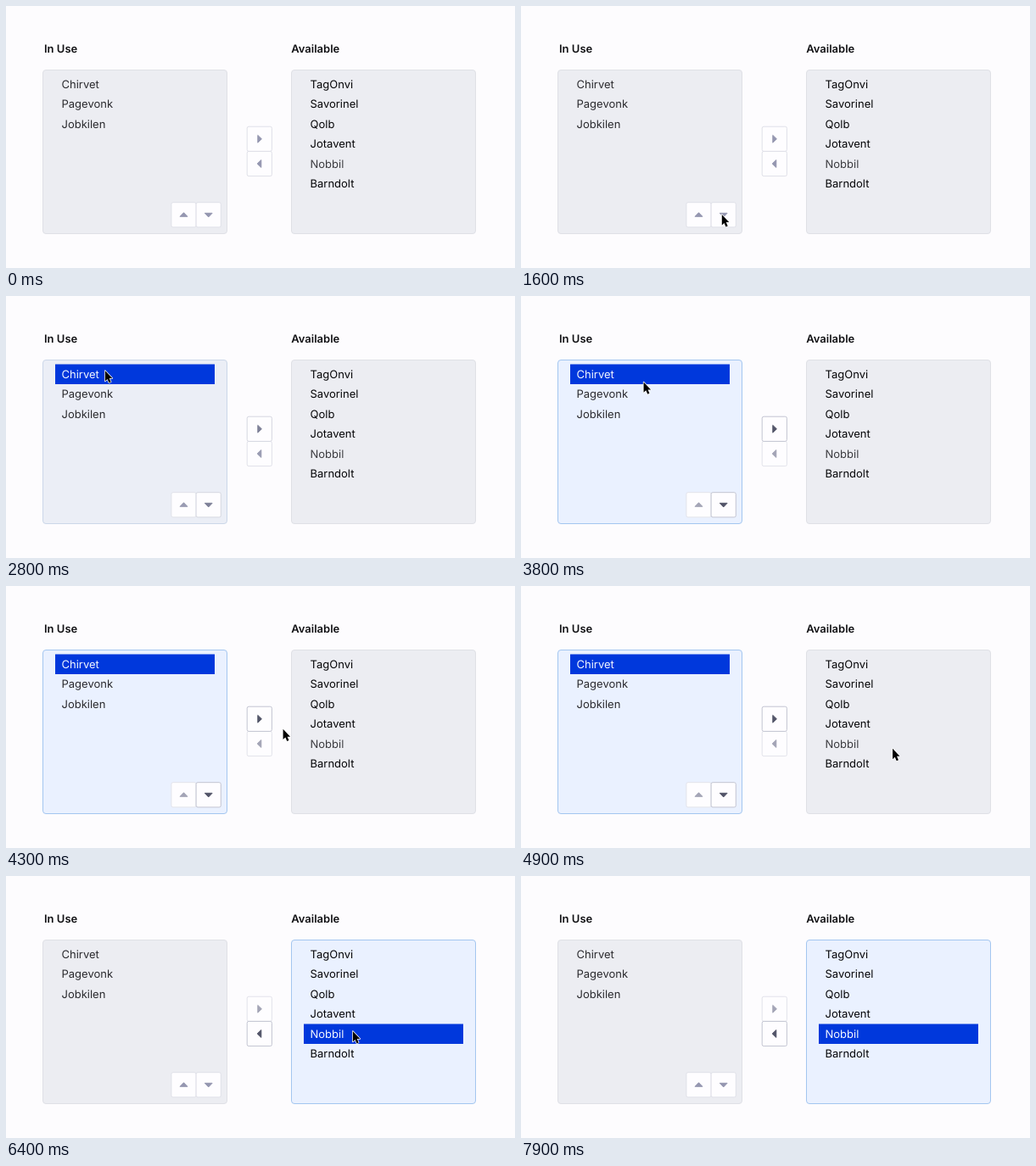
An HTML page for the animation above (9 s loop, 600 by 309 pixels).

```html
<!DOCTYPE html>
<html lang="en">
<head>
<meta charset="utf-8">
<title>List picker</title>
<style>
  html, body { margin: 0; width: 100%; height: 100%; overflow: hidden; background: #fdfcfe; }
  svg { display: block; width: 100%; height: 100%; }
  text { font: 400 13px Inter, sans-serif; text-rendering: geometricPrecision; }
  .title { font-weight: 600; fill: #111114; }
</style>
</head>
<body>
<svg id="stage" viewBox="0 0 600 309"></svg>
<script>
const LOOP = 9000, STEP = 100, FADE = 300;
const CLICKS = [2800, 6100];
const ROW = 23.5, CELL = 29.2;
const THEME = {
  panel: { idle: '#ecedf2', on: '#eaf1ff' },
  outline: { idle: '#dfe0e6', on: '#a3c6f0' },
  arrow: { idle: '#9496b0', on: '#525468', off: '#a3a4b6' },
  edge: { idle: '#dfe0e8', on: '#c2c4d1', off: '#e2e3ea' }
};
const stage = document.getElementById('stage');

function add(tag, attrs = {}, parent = stage) {
  const el = document.createElementNS('http://www.w3.org/2000/svg', tag);
  for (const key in attrs) el.setAttribute(key, attrs[key]);
  parent.append(el);
  return el;
}

function label(x, y, content, attrs) {
  const el = add('text', { x, y, ...attrs });
  el.textContent = content;
  return el;
}

const show = (el, visible) => el.setAttribute('visibility', visible ? 'visible' : 'hidden');

// Colour on the way from the previous phase's look to the current one.
function shade(colors, looks, { phase, amount }) {
  const from = colors[looks[Math.max(0, phase - 1)]], to = colors[looks[phase]];
  return `color-mix(in srgb, ${to} ${amount * 100}%, ${from})`;
}

function makeList(x, title, titleX, names, color, picked, looks) {
  label(titleX, 54.6, title, { class: 'title' });
  const panel = add('rect', { x: x + 0.5, y: 75.5, width: 217, height: 193, rx: 3.5 });
  const rowY = i => 80.5 + ROW * i;
  const bar = add('rect', { x: x + 15, y: rowY(picked), width: 188, height: ROW, fill: '#0038dc' });
  const rows = names.map((name, i) => label(x + 22.5, rowY(i) + 16.1, name, { fill: color(i) }));
  return state => {
    const selected = looks[state.phase] === 'on';
    panel.style.fill = shade(THEME.panel, looks, state);
    panel.style.stroke = shade(THEME.outline, looks, state);
    show(bar, selected);
    rows[picked].setAttribute('fill', selected ? '#f4f7ff' : color(picked));
  };
}

function makeButton(x, y, angle, looks) {
  const group = add('g');
  const box = add('rect', { x, y, width: CELL, height: CELL, rx: 2, fill: '#fefdff' }, group);
  const arrow = add('path', {
    d: 'M-2 -4.4L2.6 0L-2 4.4Z', 'stroke-width': 1, 'stroke-linejoin': 'round',
    transform: `translate(${x + CELL / 2} ${y + CELL / 2}) rotate(${angle})`
  }, group);
  return state => {
    arrow.style.fill = arrow.style.stroke = shade(THEME.arrow, looks, state);
    box.style.stroke = shade(THEME.edge, looks, state);
    if (looks[state.phase] === 'on') stage.insertBefore(group, cursor);
  };
}

const parts = [
  makeList(43, 'In Use', 45, ['Chirvet', 'Pagevonk', 'Jobkilen'],
    () => '#2a2a2e', 0, ['idle', 'on', 'idle']),
  makeList(336, 'Available', 336.2,
    ['TagOnvi', 'Savorinel', 'Qolb', 'Jotavent', 'Nobbil', 'Barndolt'],
    i => i === 4 ? '#3c3c40' : '#060608', 4, ['idle', 'idle', 'on']),
  makeButton(284.2, 142.2, 0, ['idle', 'on', 'off']),
  makeButton(284.2, 142.2 + CELL, 180, ['idle', 'off', 'on']),
  makeButton(194.9, 231.7, -90, ['idle', 'off', 'idle']),
  makeButton(194.9 + CELL, 231.7, 90, ['idle', 'on', 'idle'])
];

const cursor = add('g');
add('path', {
  d: 'M.8 1V13.4L3.5 10.9L5.5 15.4L7.7 14.4L5.8 10.1H9.3Z',
  fill: '#000', stroke: '#fff', 'stroke-width': 1.5, 'stroke-linejoin': 'round', 'paint-order': 'stroke'
}, cursor);

const easeIn = u => u * u;
const easeOut = u => 1 - (1 - u) ** 3;
const settle = u => 1 - (1 - u) ** 1.8;
const easeInOut = u => u < 0.5 ? 4 * u ** 3 : 1 - 4 * (1 - u) ** 3;

// Each move starts where the one before it ended; via bends its path.
const ENTER = 1600, LEAVE = 7900, ENTRY = [236, 245];
const MOVES = [
  { start: ENTER, end: 2500, via: [170, 174], to: [116, 87], ease: settle },
  { start: 3300, end: 5100, via: [278, 168], to: [439, 191], ease: easeInOut },
  { start: 5100, end: 5400, to: [441, 199], ease: easeInOut },
  { start: 5400, end: 6100, to: [408, 182], ease: easeOut },
  { start: 7400, end: 7800, to: [562, 157], ease: easeIn }
];

function cursorAt(t) {
  let spot = ENTRY;
  for (const { start, end, via, to, ease } of MOVES) {
    if (t < start) break;
    const from = spot, u = ease(Math.min(1, (t - start) / (end - start)));
    spot = from.map((a, i) => {
      const bend = via ? via[i] : (a + to[i]) / 2;
      return (1 - u) ** 2 * a + 2 * u * (1 - u) * bend + u * u * to[i];
    });
  }
  return spot;
}

function stateAt(t) {
  const phase = CLICKS.filter(click => t >= click).length;
  const amount = phase ? Math.min(1, (t - CLICKS[phase - 1] + STEP) / FADE) : 1;
  return { phase, amount };
}

function render(time) {
  const t = Math.floor(time % LOOP / STEP) * STEP;
  const state = stateAt(t);
  parts.forEach(update => update(state));
  show(cursor, t >= ENTER && t < LEAVE);
  cursor.setAttribute('transform', `translate(${cursorAt(t)})`);
}

const begin = performance.now();
function frame() {
  render(performance.now() - begin);
  requestAnimationFrame(frame);
}
frame();
</script>
</body>
</html>
```
